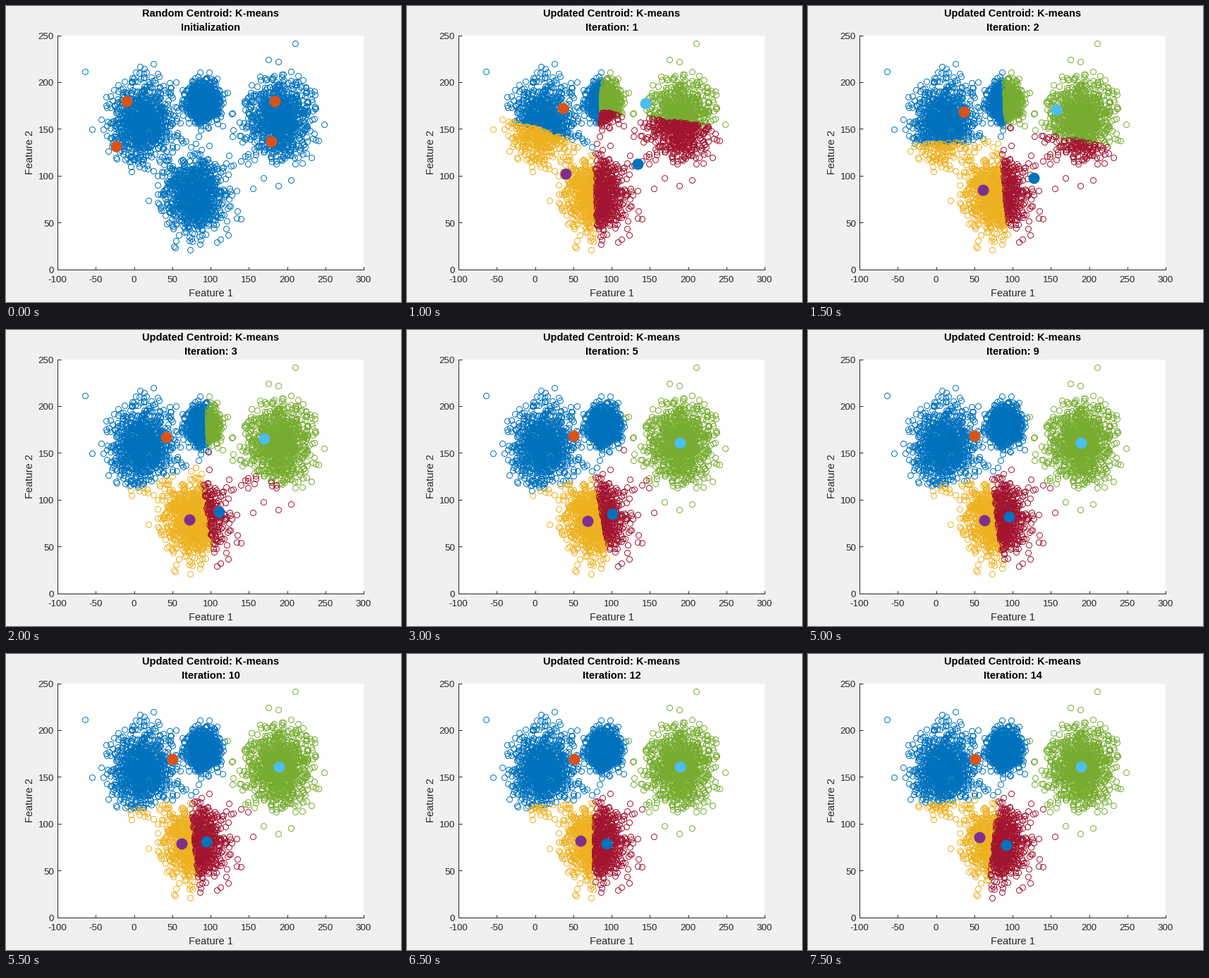
Recreate the animation shown at these times as a matplotlib script. Size 560x420 px, loop 8000 ms.

```python
import numpy as np
import matplotlib.pyplot as plt
from matplotlib.animation import FuncAnimation

W, H = 560, 420
LEFT, TOP, RIGHT, BOTTOM = 73, 41.6, 507, 373.6
PX = 0.72  # points per pixel at 100 dpi
BLUE, ORANGE, YELLOW, PURPLE = "#0072BD", "#D95319", "#EDB120", "#7E2F8E"
GREEN, SKY, WINE = "#77AC30", "#4DBEEE", "#A2142F"
DARK = "#262626"
RING_COLORS = [BLUE, YELLOW, GREEN, WINE]
DOT_COLORS = [ORANGE, PURPLE, SKY, BLUE]

BLOBS = [(10, 160, 20), (90, 179, 10), (190, 160, 20), (80, 80, 20)]
LONER = (-64, 211)
START = np.array([(-10, 179.5), (-23.4, 131.5), (184.3, 179.5), (179.7, 136.8)])
STEPS = 14


def make_points():
    rng = np.random.default_rng(7)
    blobs = [rng.normal((x, y), spread, (1000, 2)) for x, y, spread in BLOBS]
    return np.vstack(blobs + [LONER])


def k_means(points, centers):
    """Return (owner of each point, centroids) for the start and each step."""
    history = [(np.zeros(len(points), int), centers)]
    for _ in range(STEPS):
        gaps = points[:, None] - centers
        owner = (gaps ** 2).sum(axis=2).argmin(axis=1)
        centers = np.array([points[owner == k].mean(axis=0) for k in range(4)])
        history.append((owner, centers))
    return history


def label(x, y, text, size, ha="center", color=DARK, **kw):
    return fig.text(x / W, 1 - y / H, text, fontsize=size * PX, ha=ha,
                    va="baseline", color=color, family="Liberation Sans", **kw)


fig = plt.figure(figsize=(W / 100, H / 100), dpi=100, facecolor="#F0F0F0")
ax = fig.add_axes([LEFT / W, 1 - BOTTOM / H,
                   (RIGHT - LEFT) / W, (BOTTOM - TOP) / H])
ax.set(xlim=(-100, 300), ylim=(0, 250),
       xticks=range(-100, 301, 50), yticks=range(0, 251, 50))
ax.spines[["top", "right"]].set_visible(False)
ax.spines[["left", "bottom"]].set(color=DARK, linewidth=PX)
ax.tick_params(direction="in", length=4.5 * PX, width=PX, color=DARK,
               labelleft=False, labelbottom=False)

for i, v in enumerate(range(-100, 301, 50)):
    label(LEFT + 54.25 * i, 392, str(v), 13.33)
for i, v in enumerate(range(0, 251, 50)):
    label(68, BOTTOM - 66.4 * i + 5.3, str(v), 13.33, ha="right")
label(290, 412.4, "Feature 1", 14.67)
label(38, 207.5, "Feature 2", 14.67, rotation=90, rotation_mode="anchor")
title = label(290, 15.4, "", 14.67, color="black", weight="bold")
subtitle = label(290, 35, "", 14.67, color="black", weight="bold")

points = make_points()
history = k_means(points, START)
rings, dots = [], []
for ring_color, dot_color in zip(RING_COLORS, DOT_COLORS):
    rings += ax.plot([], [], "o", ms=8 * PX, mfc="none", mec=ring_color,
                     mew=PX)
    dots += ax.plot([], [], "o", ms=16 * PX, mew=0, color=dot_color)


def update(frame):
    step = max(0, frame - 1)
    kind = "Updated" if step else "Random"
    title.set_text(f"{kind} Centroid: K-means")
    subtitle.set_text(f"Iteration: {step}" if step else "Initialization")
    owner, centers = history[step]
    for k, (x, y) in enumerate(centers):
        rings[k].set_data(*points[owner == k].T)
        dots[k].set_data([x], [y])
        dots[k].set_color(DOT_COLORS[k] if step else ORANGE)
    return rings + dots + [title, subtitle]


anim = FuncAnimation(fig, update, frames=STEPS + 2, interval=500, repeat=True,
                     repeat_delay=0, blit=False)
plt.show()
```
